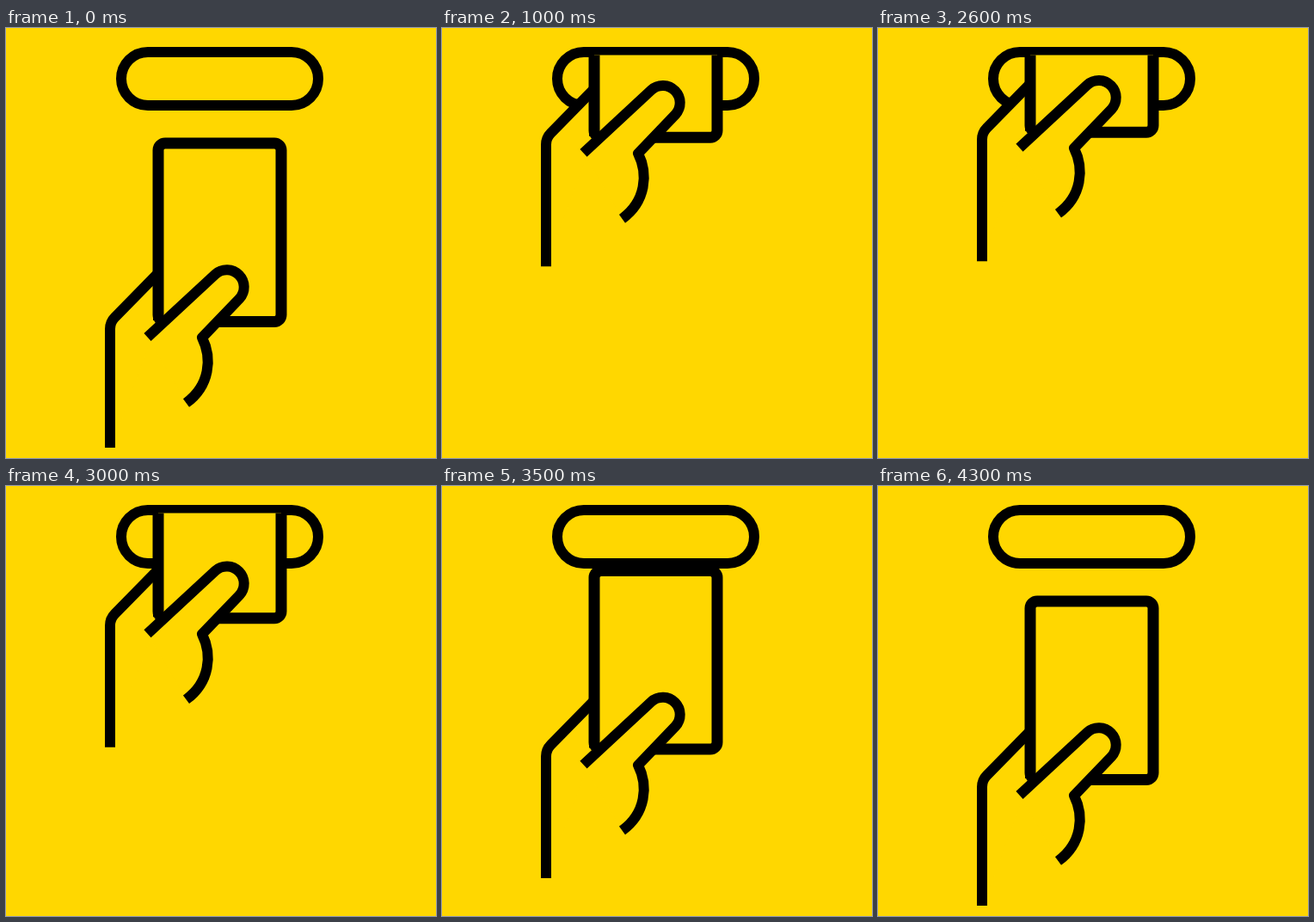
These frames come from a looping animation (500 px wide and 500 px high, 5700 ms). An HTML page:

```html
<!DOCTYPE html>
<html lang="en">
<head>
<meta charset="utf-8">
<title>Card in slot</title>
<style>
  html, body { margin: 0; height: 100%; overflow: hidden; background: #ffd700; }
  svg { display: block; width: 100%; height: 100%; }
</style>
</head>
<body>
<svg viewBox="0 0 500 500" fill="#ffd700" stroke="#000" stroke-width="12" stroke-linejoin="round">
  <clipPath id="opening"><rect y="31.5" width="500" height="456.5"/></clipPath>
  <rect x="134" y="28" width="229" height="62" rx="31"/>
  <g clip-path="url(#opening)">
    <g id="hand">
      <path d="M121 491.5V350Q121 342 126.5 336.5L177 285V340"/>
      <rect x="177" y="134" width="143" height="207.5" rx="8" stroke-width="13"/>
      <path d="M164.5 359.5L243.4 286.3A20 20 0 0 1 271.4 314.8L228 360C240 384 237 416 209.5 436"/>
    </g>
  </g>
</svg>
<script>
  const LOOP = 5700, STEP = 100, TRAVEL = 221;
  const hand = document.getElementById('hand');

  // Ease with flat ends; x1 and x2 are the horizontal handle positions.
  function ease(u, x1, x2) {
    if (u <= 0) return 0;
    if (u >= 1) return 1;
    let lo = 0, hi = 1;
    for (let i = 0; i < 30; i++) {
      const s = (lo + hi) / 2, r = 1 - s;
      if (3 * s * r * r * x1 + 3 * s * s * r * x2 + s ** 3 < u) lo = s;
      else hi = s;
    }
    return lo * lo * (3 - 2 * lo);
  }

  function draw(now) {
    const t = Math.floor(now % LOOP / STEP) * STEP;
    const inserted = ease((t - 100) / 1250, 0.1, 0) - ease((t - 2500) / 1710, 0.6, 0.195);
    hand.setAttribute('transform', `translate(0 ${-TRAVEL * inserted})`);
  }

  let start;
  function tick(now) {
    start ??= now;
    draw(now - start);
    requestAnimationFrame(tick);
  }
  draw(0);
  requestAnimationFrame(tick);
</script>
</body>
</html>
```
